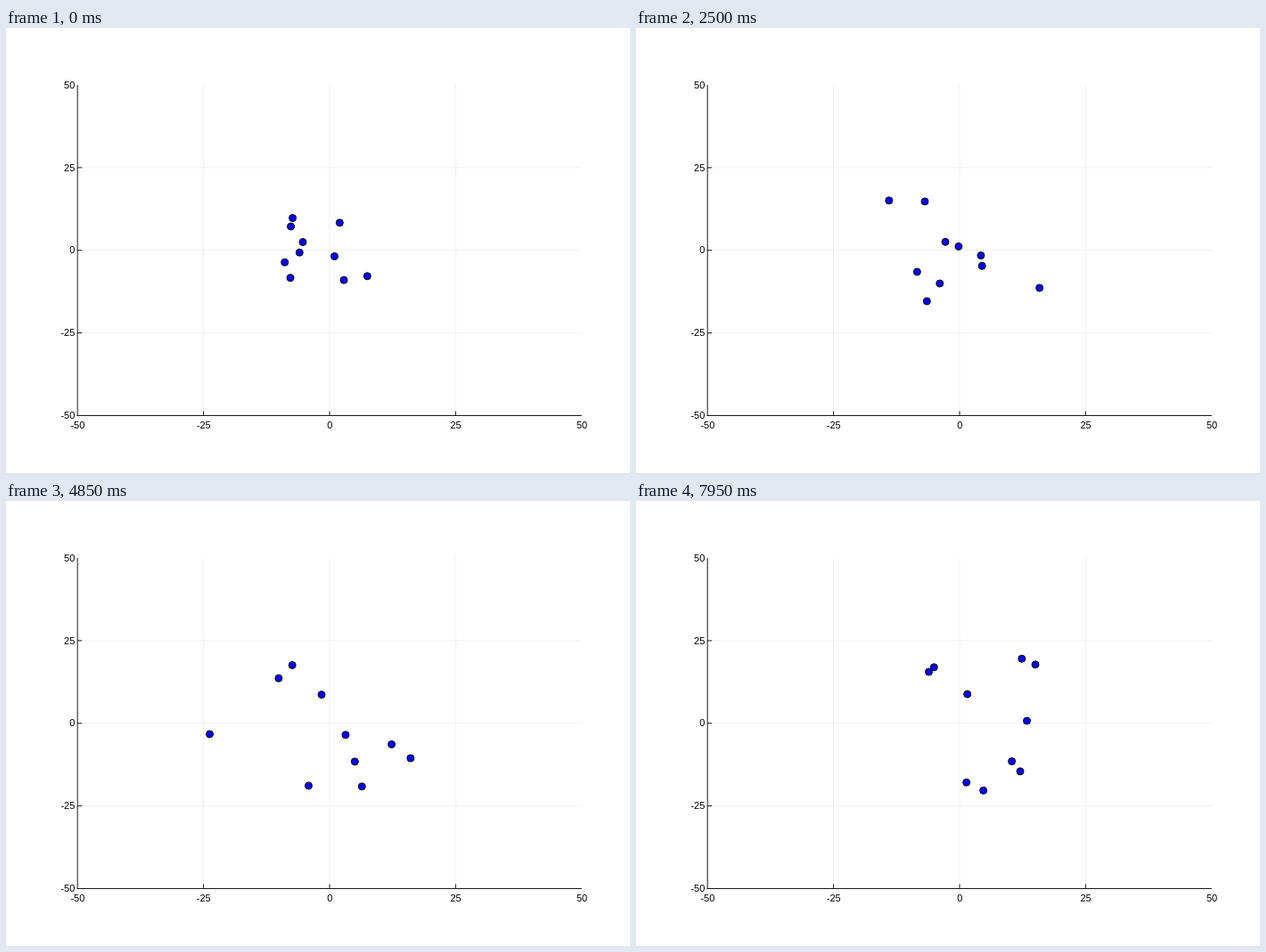
Recreate the animation shown at these times as an HTML page. Size 700 by 500 pixels, loop 8000 ms.

```html
<!DOCTYPE html>
<html lang="en">
<head>
<meta charset="utf-8">
<title>Drifting particles</title>
<style>
html, body { margin: 0; width: 100%; height: 100%; overflow: hidden; background: #fff; }
svg { display: block; }
text { font: 11px "Liberation Sans", Arial, sans-serif; fill: #000; }
.grid { stroke: #000; stroke-opacity: .06; }
.axis { stroke: #000; stroke-opacity: .9; }
.dot { fill: #00f; stroke: #000; stroke-width: 1; }
</style>
</head>
<body>
<svg id="stage" width="700" height="500" viewBox="0 0 700 500"></svg>
<script>
const LOOP = 8000, STEP = 50;
const LEFT = 80.2, RIGHT = 645.8, TOP = 64, BOTTOM = 435.5;
const stage = document.getElementById('stage');

function add(tag, attrs, label) {
  const node = document.createElementNS('http://www.w3.org/2000/svg', tag);
  for (const key in attrs) node.setAttribute(key, attrs[key]);
  if (label !== undefined) node.textContent = label;
  return stage.appendChild(node);
}

const line = (kind, x1, y1, x2, y2) => add('line', { class: kind, x1, y1, x2, y2 });

function drawAxes() {
  const px = v => LEFT + (v + 50) / 100 * (RIGHT - LEFT);
  const py = v => BOTTOM - (v + 50) / 100 * (BOTTOM - TOP);
  for (let v = -50; v <= 50; v += 25) {
    if (Math.abs(v) < 50) {
      line('grid', px(v), TOP, px(v), BOTTOM);
      line('grid', LEFT, py(v), RIGHT, py(v));
      line('axis', px(v), BOTTOM, px(v), BOTTOM - 5);
      line('axis', LEFT, py(v), LEFT + 5, py(v));
    }
    add('text', { x: px(v) + .2, y: 450, 'text-anchor': 'middle' }, v);
    add('text', { x: 77.3, y: py(v) + 3.65, 'text-anchor': 'end' }, v);
  }
  line('axis', LEFT, TOP, LEFT, BOTTOM + .5);
  line('axis', LEFT - .5, BOTTOM, RIGHT, BOTTOM);
}

// Both path kinds take [time, x, y] keys and return a coordinate by time.
function segment(keys, time) {
  let i = 0;
  while (i < keys.length - 2 && time >= keys[i + 1][0]) i++;
  const span = keys[i + 1][0] - keys[i][0];
  return { i, span, u: (time - keys[i][0]) / span };
}

// Slow drift: a smooth curve through the keys.
function drift(keys, axis) {
  const last = keys.length - 1;
  const span = i => keys[i + 1][0] - keys[i][0];
  const slope = i => (keys[i + 1][axis] - keys[i][axis]) / span(i);
  const tangent = keys.map((_, i) => i > 0 && i < last
    ? (slope(i - 1) * span(i) + slope(i) * span(i - 1)) / (span(i - 1) + span(i)) : 0);
  tangent[0] = 1.5 * slope(0) - .5 * tangent[1];
  tangent[last] = 1.5 * slope(last - 1) - .5 * tangent[last - 1];

  return time => {
    const { i, span: h, u } = segment(keys, time), w = 1 - u;
    return w * w * (1 + 2 * u) * keys[i][axis] + u * u * (3 - 2 * u) * keys[i + 1][axis]
      + h * u * w * (w * tangent[i] - u * tangent[i + 1]);
  };
}

// Fast flight: straight legs, with corners rounded by averaging over a short window.
function flight(keys, axis) {
  const window = 300, samples = 12;
  const onLeg = time => {
    const { i, u } = segment(keys, time);
    return keys[i][axis] + u * (keys[i + 1][axis] - keys[i][axis]);
  };
  return time => {
    let sum = 0;
    for (let k = 0; k < samples; k++) sum += onLeg(time + ((k + .5) / samples - .5) * window);
    return sum / samples;
  };
}

const dots = [];
function dot(path, ...keys) {
  dots.push({ node: add('circle', { class: 'dot', r: 4 }), x: path(keys, 1), y: path(keys, 2) });
}

drawAxes();

dot(drift, [0, 321.5, 213.5], [3250, 324, 190.8], [5650, 320.8, 183.5], [7950, 328.5, 192]);
dot(drift, [0, 319, 280.7], [3250, 329.8, 312.5], [5650, 345.8, 321.3], [7950, 370.7, 316.2]);
dot(drift, [0, 368.5, 256.5], [3250, 391.3, 273.3], [5650, 390.5, 302.7], [7950, 389.7, 325.3]);
dot(drift, [0, 329.3, 252.3], [1750, 342, 248.3], [3250, 351, 231.2], [6650, 347.3, 202.2], [7950, 334.3, 186.8]);
dot(drift, [0, 374.3, 218.8], [1750, 361.7, 240.3], [3250, 365, 249.8], [5650, 391, 270], [7950, 421.6, 292.5]);
dot(drift, [0, 319.5, 223], [1750, 291.5, 201.8], [3250, 281.2, 188.8], [5650, 323.2, 206.3], [7950, 371.7, 217]);
dot(drift, [0, 405.3, 278.8], [1750, 439, 288.2], [3250, 462.4, 294.2], [5650, 445.5, 278.8], [6650, 437.4, 256.7], [7950, 438.5, 247]);
dot(drift, [0, 333, 240.5], [1750, 372.8, 247], [3250, 400.2, 264.7], [5650, 442.5, 278.2], [7950, 431, 303.8]);

// These two meet, are flung apart and turn back at the rim.
dot(flight, [0, 312.7, 263.3], [1750, 315.2, 267], [3250, 315.5, 281], [3750, 319, 287],
    [5230, 427, 332.5], [6650, 444.2, 264.3], [7950, 448, 183.8]);
dot(flight, [0, 379, 283.2], [3250, 329.3, 288.2], [3750, 319, 287],
    [4960, 219, 259.5], [6650, 343.7, 195.7], [7600, 411, 167], [7950, 432.8, 177.2]);

function draw(now) {
  const time = Math.floor(now % LOOP / STEP) * STEP;
  for (const { node, x, y } of dots) {
    node.setAttribute('cx', x(time).toFixed(2));
    node.setAttribute('cy', y(time).toFixed(2));
  }
}

const start = performance.now();
function tick() {
  draw(performance.now() - start);
  requestAnimationFrame(tick);
}
tick();
</script>
</body>
</html>
```
